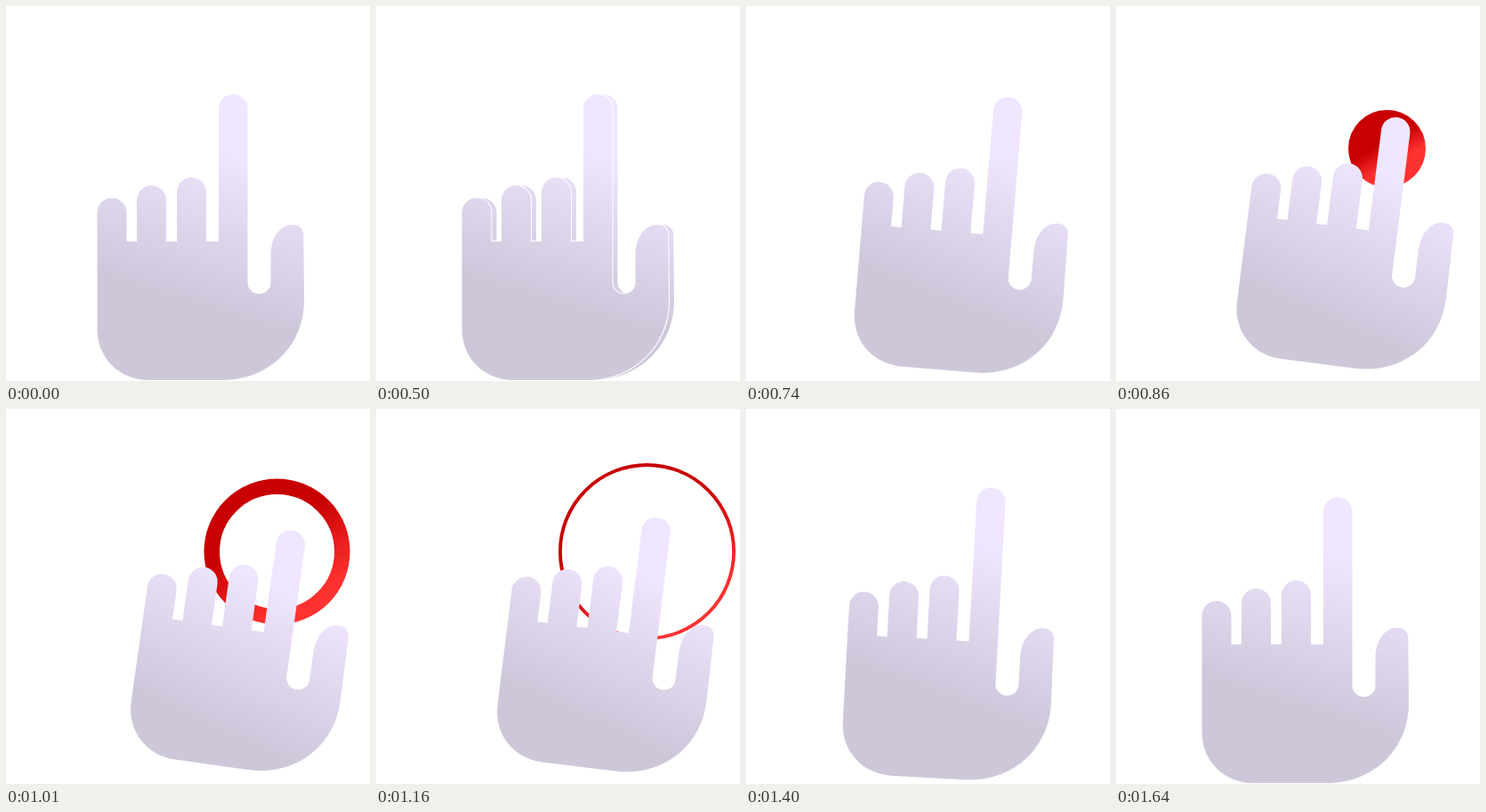
Write an HTML page that moves like this. It is 409 px wide and 422 px high and loops after 2120 ms.

```html
<!DOCTYPE html>
<html lang="en">
<head>
<meta charset="utf-8">
<title>Tapping hand</title>
<style>
  html, body { margin: 0; width: 100%; height: 100%; overflow: hidden; background: #fff; }
  svg { display: block; width: 100%; height: 100%; }
</style>
</head>
<body>
<svg viewBox="0 0 409 422">
  <defs>
    <linearGradient id="skin" gradientUnits="userSpaceOnUse" x1="249" y1="163" x2="198" y2="331">
      <stop offset="0" stop-color="#f0e6ff"/>
      <stop offset="1" stop-color="#cec7da"/>
    </linearGradient>
    <linearGradient id="red" x1=".41" y1=".35" x2=".71" y2=".87">
      <stop offset="0" stop-color="#c80000"/>
      <stop offset="1" stop-color="#ff3131"/>
    </linearGradient>
  </defs>
  <circle id="ring" cx="304.5" cy="160.5" fill="none" stroke="url(#red)"/>
  <path id="trail" fill="url(#skin)" transform="translate(6 0)"/>
  <path id="hand" fill="url(#skin)" stroke="#fff" paint-order="stroke"/>
</svg>
<script>
const LOOP = 2120, START = 500, END = 1640, STEP = 30;
const [skin, ring, trail, hand] =
  ['skin', 'ring', 'trail', 'hand'].map(id => document.getElementById(id));

// Keys are [time, value].
const shift = [[500, 0], [740, .585], [940, 1], [1010, 1], [1160, .905], [1400, .3], [1640, 0]];
const turn = [[500, 0], [740, .6], [940, 1], [1010, 1], [1160, .88], [1400, .39], [1640, 0]];
const reach = [[640, 0], [740, -9.5], [960, -50], [1010, -48], [1160, -32.5],
  [1380, 8], [1400, 8], [1550, 0]];

// Smooth curve through the keys, flat at both ends and at every turning point.
function sample(keys, t) {
  const last = keys.length - 1;
  if (t <= keys[0][0]) return keys[0][1];
  if (t >= keys[last][0]) return keys[last][1];
  const slope = i => {
    if (i === 0 || i === last) return 0;
    const [a, b, c] = keys.slice(i - 1, i + 2);
    const before = (b[1] - a[1]) / (b[0] - a[0]);
    const after = (c[1] - b[1]) / (c[0] - b[0]);
    return before * after <= 0 ? 0 : 2 * before * after / (before + after);
  };
  const i = keys.findIndex(k => k[0] > t) - 1;
  const [t0, v0] = keys[i], [t1, v1] = keys[i + 1];
  const span = t1 - t0, u = (t - t0) / span, w = 1 - u;
  return v0 * w * w * (1 + 2 * u) + v1 * u * u * (3 - 2 * u)
    + span * u * w * (slope(i) * w - slope(i + 1) * u);
}

const cap = r => `a${r} ${r} 0 0 1 ${2 * r} 0`;

function handPath(extra) {
  return `M96.5 232.5${cap(16.5)}V265H141V218.5${cap(16.5)}V265H186V209.5${cap(16.5)}V265H233
    V${115.5 - extra}${cap(16.25)}V311a13 13 0 0 0 26 0V281
    C291.5 259 303 246 316 246C324 246 328.3 251 328.3 258L329 331
    C329 384 288 421 237 421H155C122 421 96.5 397 96.5 363Z`;
}

function drawRing(t) {
  const left = 1 - (t - 756) / 634;
  const visible = left > 0 && left < 1;
  ring.setAttribute('visibility', visible ? 'visible' : 'hidden');
  if (!visible) return;
  const rest = left ** 3, outer = 104.5 * (1 - rest), width = Math.min(outer, 81.5 * rest);
  ring.setAttribute('r', outer - width / 2);
  ring.setAttribute('stroke-width', width);
}

function draw(time) {
  const clock = time % LOOP;
  const resting = clock < START;
  const t = resting ? START : Math.min(END, START + Math.floor((clock - START) / STEP) * STEP);
  const doubled = !resting && t === START;
  const move = sample(shift, t), extra = sample(reach, t);

  drawRing(t);
  trail.setAttribute('visibility', doubled ? 'visible' : 'hidden');
  hand.setAttribute('stroke-width', doubled ? 2 : 0);
  hand.setAttribute('d', handPath(extra));
  hand.setAttribute('transform',
    `translate(${resting ? 6 : 52 * move} ${-19 * move}) rotate(${8 * sample(turn, t)} 200 300)`);
  skin.setAttribute('gradientTransform', `translate(0 ${-extra})`);
}

trail.setAttribute('d', handPath(0));
const begin = performance.now();
function tick() {
  draw(performance.now() - begin);
  requestAnimationFrame(tick);
}
tick();
</script>
</body>
</html>
```
